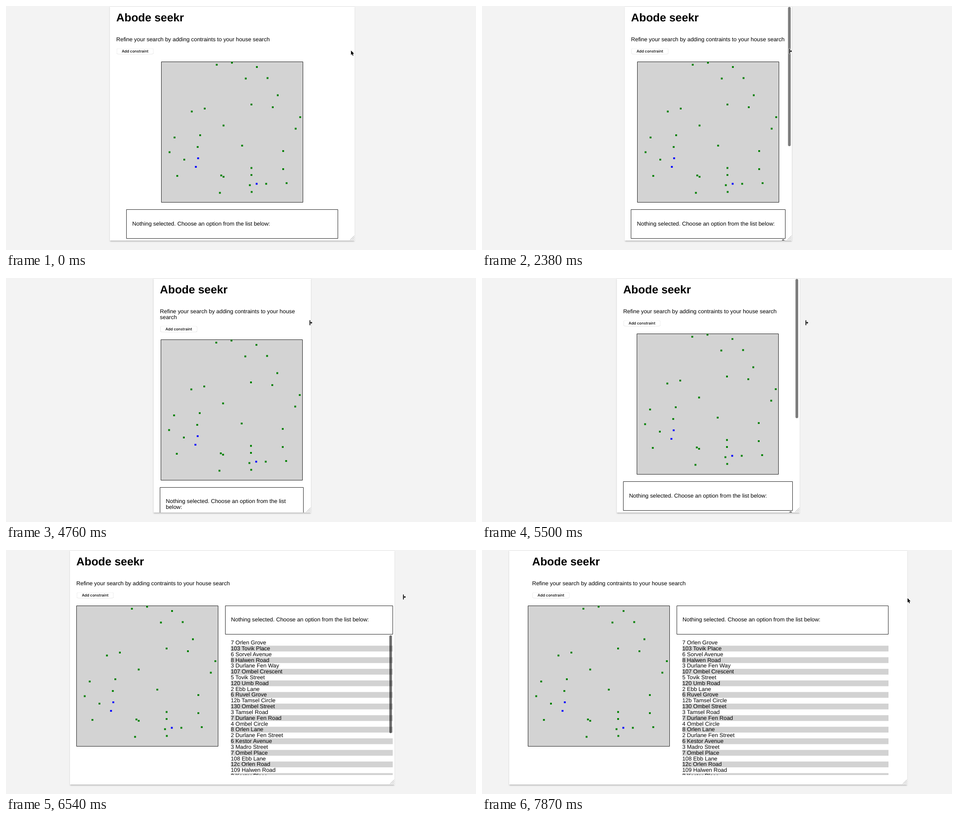
Recreate the animation shown at these times as an HTML page with a canvas. Size 1036 by 540 pixels, loop 8 s.

```html
<!DOCTYPE html>
<html lang="en">
<head>
<meta charset="utf-8">
<title>Responsive house search</title>
<style>
  html, body { margin: 0; width: 100%; height: 100%; overflow: hidden; background: #f3f3f3; }
  canvas { display: block; width: 1036px; height: 540px; }
</style>
</head>
<body>
<canvas id="stage" width="1036" height="540"></canvas>
<script>
const ctx = document.getElementById('stage').getContext('2d');
const LOOP = 8000;
const SANS = '"Liberation Sans", Arial, sans-serif';
const BODY = '12.43px ' + SANS;
const LINE = 12.82;
const PAD = 14;
const BOTTOM = 519;
const INTRO = 'Refine your search by adding contraints to your house search';
const PROMPT = 'Nothing selected. Choose an option from the list below:';

const ADDRESSES = [
  '7 Orlen Grove', '103 Tovik Place', '6 Sorvel Avenue', '8 Halwen Road',
  '3 Durlane Fen Way', '107 Ombel Crescent', '5 Tovik Street', '120 Umb Road',
  '2 Ebb Lane', '6 Ruvel Grove', '12b Tamsel Circle', '130 Ombel Street',
  '3 Tamsel Road', '7 Durlane Fen Road', '4 Ombel Circle', '8 Orlen Lane',
  '2 Durlane Fen Street', '6 Kestor Avenue', '3 Madro Street', '7 Ombel Place',
  '108 Ebb Lane', '12c Orlen Road', '109 Halwen Road', '2 Kestor Place'
];

// House positions, relative to the map corner
const GREEN = [
  [122.5, 7], [156, 2.5], [211, 12], [186.5, 37.5], [234.5, 36.5], [257, 74.5],
  [199, 95], [246, 101], [67.5, 110.5], [96, 104], [306.5, 123], [296.5, 148.5],
  [137.5, 141.5], [29.5, 168], [86, 163], [80.5, 189], [178.5, 186], [269, 198],
  [18.5, 200.5], [51, 217], [199, 235.5], [269, 238], [199, 251], [35.5, 253],
  [132.5, 252], [137.5, 255], [276.5, 269], [231.5, 270.5], [195.5, 273.5],
  [199.5, 288.5], [129.5, 290.5]
];
const BLUE = [[81.5, 214], [76.5, 233], [210.5, 270.5]];

// Bursts of resizing: start, end, number of steps
const BURSTS = [
  [1340, 2380, 8], [2520, 3270, 6], [4760, 5790, 8], [5940, 6840, 7], [6990, 7870, 7]
];

const linear = p => p;
const smooth = p => p * p * (3 - 2 * p);
const easeIn = p => Math.pow(p, 2.5);
const easeOut = p => 1 - (1 - p) * (1 - p);

// time, panel left, layout width, cursor x, cursor y, easing towards the next key
const KEYS = [
  [0, 229, 539.5, 765.5, 104, linear],
  [1340, 230, 540, 765.5, 104, smooth],
  [2380, 314.5, 368, 678, 100, easeOut],
  [3270, 326, 345.5, 670, 99, linear],
  [4760, 325.3, 344.5, 670, 99, easeIn],
  [5790, 260, 477.5, 772, 99, linear],
  [5940, 225, 552.5, 786.5, 99, linear],
  [6540, 141, 725.5, 876, 104, linear],
  [6840, 112, 778, 902, 104, easeOut],
  [7870, 60, 877.4, 939, 107, linear]
];

function stepTime(t) {
  let held = 0;
  for (const [start, end, count] of BURSTS) {
    if (t < start) break;
    const gap = (end - start) / (count - 1);
    held = Math.min(end, start + Math.floor((t - start) / gap + 1e-6) * gap);
  }
  return held;
}

function poseAt(t) {
  const i = KEYS.findIndex(k => k[0] > t);
  if (i < 0) return KEYS[KEYS.length - 1].slice(1, 5);
  const a = KEYS[i - 1], b = KEYS[i];
  const p = a[5]((t - a[0]) / (b[0] - a[0]));
  return [1, 2, 3, 4].map(n => a[n] + (b[n] - a[n]) * p);
}

function barAlpha(t) {
  if (t < 1485) return 0;
  if (t < 3710) return 1;
  if (t < 3860) return 0.5;
  if (t < 4905) return 0;
  if (t < 7575) return 1;
  return t < 7720 ? 0.5 : 0;
}

function wrap(str, width) {
  ctx.font = BODY;
  const lines = [];
  let line = '';
  for (const word of str.split(' ')) {
    const next = line ? line + ' ' + word : word;
    if (line && ctx.measureText(next).width > width) {
      lines.push(line);
      line = word;
    } else line = next;
  }
  return lines.concat(line);
}

function text(str, x, y, font = BODY, align = 'left') {
  ctx.font = font;
  ctx.textAlign = align;
  ctx.fillStyle = '#000';
  ctx.fillText(str, x, y);
}

function paragraph(lines, x, y) {
  lines.forEach((line, i) => text(line, x, y + i * LINE));
}

function frame(x, y, right, bottom, fill) {
  const left = Math.floor(x) + 0.5, top = Math.round(y) + 0.5;
  const w = Math.floor(right) + 0.5 - left, h = Math.round(bottom) + 0.5 - top;
  ctx.fillStyle = fill;
  ctx.fillRect(left, top, w, h);
  ctx.lineWidth = 1;
  ctx.strokeStyle = 'rgba(0,0,0,0.85)';
  ctx.strokeRect(left, top, w, h);
}

function pill(x, y, w, h, fill) {
  ctx.fillStyle = fill;
  ctx.beginPath();
  ctx.roundRect(x, y, w, h, Math.min(w, h) / 2);
  ctx.fill();
}

function button(x, y) {
  ctx.fillStyle = '#d4d4d4';
  ctx.beginPath();
  ctx.roundRect(x, y, 81, 12.6, 2.5);
  ctx.fill();
  ctx.fillStyle = '#fff';
  ctx.beginPath();
  ctx.roundRect(x + 0.4, y + 0.3, 80.2, 11.8, 2.3);
  ctx.fill();
  text('Add constraint', x + 40.5, y + 9.2, '500 8.4px Inter, sans-serif', 'center');
}

function dots(points, x, y, color) {
  ctx.fillStyle = color;
  for (const [dx, dy] of points) ctx.fillRect(x + dx - 2, y + dy - 2, 4, 4);
}

function list(x, right, top) {
  ctx.save();
  ctx.beginPath();
  ctx.rect(x, top, right - x, 311);
  ctx.clip();
  ADDRESSES.forEach((address, i) => {
    const y = top + 11.8 + i * LINE;
    if (i % 2) {
      ctx.fillStyle = '#d2d2d2';
      ctx.fillRect(x + 12.4, y, right - x, LINE);
    }
    text(address, x + 12.4, y + 10.2);
  });
  ctx.restore();
}

function grip(right) {
  ctx.strokeStyle = '#8c8c8c';
  ctx.lineWidth = 0.8;
  ctx.beginPath();
  for (const d of [10, 6.5, 3]) {
    ctx.moveTo(right - d, 518);
    ctx.lineTo(right - 0.5, 518.5 - d);
  }
  ctx.stroke();
}

function panel(left, right) {
  ctx.save();
  ctx.shadowColor = 'rgba(0,0,0,0.25)';
  ctx.shadowBlur = 3;
  ctx.shadowOffsetY = 1.5;
  ctx.fillStyle = '#fff';
  ctx.fillRect(left, 0.5, right - left, BOTTOM - 0.5);
  ctx.restore();
  ctx.fillStyle = '#dcdcdc';
  ctx.fillRect(left, 0, right - left, 1);
}

function page(left, width, right, alpha) {
  const stacked = width < 546;
  const inner = width - PAD * 2;
  const introX = left + PAD + Math.max(0, (inner - 776.5) / 2);
  const intro = wrap(INTRO, inner);
  const shift = (intro.length - 1) * LINE;
  const mapY = 123 + shift;
  const mapX = Math.floor(stacked
    ? left + (width - 313) / 2
    : left + PAD + Math.max(0, (inner - 795) / 2));
  const boxW = Math.min(467, stacked ? inner : inner - 328);
  const boxX = stacked ? left + (width - boxW) / 2 : mapX + 328;
  const boxY = stacked ? mapY + 327.4 : mapY;
  const boxRight = boxX + boxW - 0.5;
  const prompt = wrap(PROMPT, boxW - 26);
  const boxEnd = boxY + 63.4 + (prompt.length - 1) * LINE;

  ctx.save();
  ctx.beginPath();
  ctx.rect(left, 0, right - left, BOTTOM);
  ctx.clip();

  text('Abode seekr', introX, 34, 'bold 24.86px ' + SANS);
  paragraph(intro, introX, 77.8);
  button(introX + 1, 94 + shift);

  frame(mapX, mapY, mapX + 312, mapY + 311, '#d3d3d3');
  dots(GREEN, mapX, Math.round(mapY), '#008000');
  dots(BLUE, mapX, Math.round(mapY), '#00f');

  frame(boxX, boxY, boxRight, boxEnd, '#fff');
  paragraph(prompt, boxX + 13, boxY + 35.2);
  list(boxX, boxRight + 0.5, boxEnd + 0.7);

  if (alpha) {
    pill(boxRight - 7, boxEnd + 2.4, 5.7, 216.5, `rgba(0,0,0,${0.57 * alpha})`);
    const total = boxEnd + 311 + (stacked ? 42.5 : 13);
    if (total > BOTTOM) {
      pill(left + width - 8, 2, 6, 515 * BOTTOM / total, `rgba(0,0,0,${0.51 * alpha})`);
    }
  }
  grip(right);
  ctx.restore();
}

function shape(points, x, y) {
  ctx.beginPath();
  points.forEach(([dx, dy]) => ctx.lineTo(x + dx, y + dy));
  ctx.closePath();
  ctx.lineJoin = 'round';
  ctx.strokeStyle = '#fff';
  ctx.lineWidth = 1.6;
  ctx.stroke();
  ctx.fillStyle = '#000';
  ctx.fill();
}

const ARROW = [[0.5, 0.5], [0.5, 10.3], [2.7, 8.3], [4.2, 11.9], [5.8, 11.2], [4.3, 7.7], [7.2, 7.5]];
const RESIZE = [
  [-0.9, -5.5], [0.8, -5.5], [0.8, -0.7], [2.5, -0.7], [2.5, -2.7],
  [5.2, 0], [2.5, 2.7], [2.5, 0.7], [0.8, 0.7], [0.8, 5.5], [-0.9, 5.5]
];

function cursor(t, x, y) {
  if (t < 590) shape(ARROW, 760, 98);
  else if (t < 890) shape(ARROW, 764, 98);
  else if (t < 7720) shape(RESIZE, x, y);
  else shape(ARROW, 937.5, 106);
}

function draw(now) {
  const t = now % LOOP;
  const [left, width, x, y] = poseAt(stepTime(t));
  const right = 997.4 - left;
  ctx.fillStyle = '#f3f3f3';
  ctx.fillRect(0, 0, 1036, 540);
  panel(left, right);
  page(left, width, right, barAlpha(t));
  cursor(t, x, y);
}

ctx.textRendering = 'geometricPrecision';
let begun;
function tick(now) {
  begun ??= now;
  draw(now - begun);
  requestAnimationFrame(tick);
}
draw(0);
requestAnimationFrame(tick);
</script>
</body>
</html>
```
